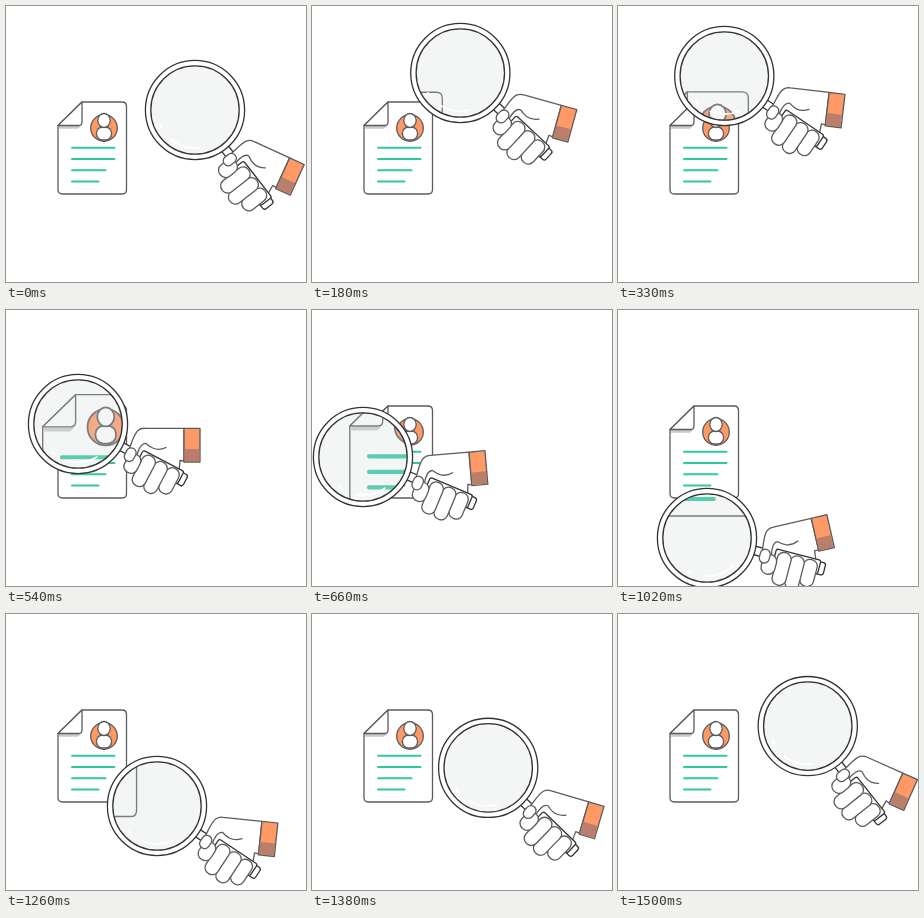
Recreate the animation shown at these times as an HTML page. Size 300 by 276 pixels, loop 1530 ms.

```html
<!DOCTYPE html>
<html lang="en">
<head>
<meta charset="utf-8">
<title>Magnifier scanning a profile</title>
<style>
  html, body { margin: 0; width: 100%; height: 100%; overflow: hidden; background: #fff; }
  svg { display: block; width: 100vw; height: 100vh; --edge: 1.3; --bar: 2; --lift: 0px; }
  #zoom { --edge: 1; --bar: 3; --lift: -2.3px; }
  .line { fill: #fff; stroke: #5c5c5e; stroke-width: 1.3; stroke-linejoin: round; stroke-linecap: round; }
  .sheet { stroke-width: var(--edge); }
  .dark { stroke: #343436; }
  .none { fill: none; }
  .orange { fill: #ff9966; }
  .avatar { transform: translateY(var(--lift)); }
  .bars { fill: none; stroke: #2fc9a0; stroke-width: var(--bar); stroke-linecap: round; }
  .shine { fill: none; stroke: #fff; stroke-width: 1.6; stroke-linecap: round; }
</style>
</head>
<body>
<svg viewBox="0 0 300 276">
  <defs>
    <clipPath id="glass"><circle r="44.5"/></clipPath>
    <g id="page">
      <path class="line sheet" d="M76 96H116Q120.500 96 120.500 100.500V183.500Q120.500 188 116 188H56.500Q52 188 52 183.500V119.500Z"/>
      <path d="M53 120H75L72 122.800H53Z" fill="#c9cbcb"/>
      <path class="line sheet" d="M76 96V116Q76 119.500 72.500 119.500H52Z"/>
      <g class="avatar">
        <circle class="line orange" cx="98" cy="122" r="13.300"/>
        <rect class="line" x="90.500" y="121" width="15" height="13" rx="6"/>
        <ellipse class="line" cx="98" cy="114.500" rx="6.200" ry="7"/>
      </g>
      <path class="bars" id="bars"/>
    </g>
  </defs>

  <use href="#page"/>

  <g id="lens">
    <g id="neck">
      <rect class="line dark" x="48" y="-4.300" width="16" height="8.600" transform="rotate(27.600)"/>
    </g>
    <circle class="line dark" r="49.600"/>
    <g clip-path="url(#glass)">
      <rect x="-50" y="-50" width="100" height="100" fill="#fff"/>
      <use id="zoom" href="#page"/>
      <circle r="45" fill="#d4d9d9" opacity=".26"/>
    </g>
    <circle class="line dark none" r="44.200"/>
    <g id="hand">
      <path class="shine" d="M-9.800 36.700A38 38 0 0 0 19 33M-26 27.700A38 38 0 0 0 -22.800 30.400"/>
      <path class="line" d="M51 25C54 18 56 10 60 6.500Q63 4 67 4.300H106V37L102 36.500L101 48L70 44L54 36Z"/>
      <path class="line none" d="M59 31C61 24 64 19 68 19.500C72 23 78 28 88 23.500"/>
      <rect class="line orange" x="106" y="4.300" width="16" height="33.700"/>
      <rect x="106.600" y="25" width="14.800" height="12.400" fill="#b97f6c"/>
      <g transform="rotate(27.600)">
        <rect class="line dark" x="112" y="-5.500" width="9.500" height="12.500" rx="2.500"/>
        <rect class="line dark" x="70" y="-7" width="46" height="14" rx="2"/>
        <g id="fingers"></g>
        <rect class="line" x="55.500" y="-4" width="10" height="14" rx="5"/>
      </g>
    </g>
  </g>
</svg>
<script>
const LOOP = 1530, STEP = 30, ZOOM = 1.37;
const $ = id => document.getElementById(id);

// Lens pose at a few moments: ms, x, y, tilt
const poses = [
  [0, 189, 104, 24.5], [240, 131, 63.6, 11.5], [330, 106.3, 70, 6.6], [540, 72, 114, 0],
  [660, 51, 147, -5], [780, 67, 177.5, -9.5], [1020, 89, 228, -13], [1260, 151, 192, 6]
];

// Closed cubic spline through unevenly timed poses
function poseAt(t) {
  const n = poses.length;
  const key = i => {
    const [ms, ...rest] = poses[(i + n) % n];
    return [ms + Math.floor(i / n) * LOOP, ...rest];
  };
  const i = poses.findLastIndex(p => p[0] <= t);
  const [a, b, c, d] = [i - 1, i, i + 1, i + 2].map(key);
  const slope = (p, q, j) => (q[j] - p[j]) / (q[0] - p[0]);
  const tangent = (p, q, r, j) => {
    const h = q[0] - p[0], g = r[0] - q[0];
    return (slope(p, q, j) * g + slope(q, r, j) * h) / (h + g);
  };
  const span = c[0] - b[0], s = (t - b[0]) / span, w = 1 - s;
  return [1, 2, 3].map(j =>
    b[j] * (1 + 2 * s) * w * w + c[j] * s * s * (3 - 2 * s)
    + span * s * w * (tangent(a, b, c, j) * w - tangent(b, c, d, j) * s));
}

$('bars').setAttribute('d', [43, 43, 34, 27]
  .map((width, i) => `M66 ${141.7 + 11.3 * i}h${width - 0.5}`).join(''));

// Knuckles sit along the handle, their tips on an arc
for (let i = 3; i >= 0; i--) {
  const top = i ? -5.5 : 0, tip = 29 - 3.6 * (i - 1.6) ** 2;
  $('fingers').innerHTML +=
    `<rect class="line" x="${59.5 + 13.5 * i}" y="${top}" width="14" height="${tip - top}" rx="6.5"/>`;
}

function draw(now) {
  const t = Math.floor(now % LOOP / STEP) * STEP;
  const [x, y, tilt] = poseAt(t);
  const left = 36.5 + 5.5 * Math.exp(-(((t - 900) / 200) ** 2));
  const top = 86.5 - 10 * (t / 1260) ** 2;
  $('lens').setAttribute('transform', `translate(${x} ${y})`);
  for (const id of ['neck', 'hand']) $(id).setAttribute('transform', `rotate(${tilt})`);
  $('zoom').setAttribute('transform',
    `translate(${left - x} ${top - y}) scale(${ZOOM}) translate(-52 -96)`);
}

const start = performance.now();
function tick() {
  draw(performance.now() - start);
  requestAnimationFrame(tick);
}
tick();
</script>
</body>
</html>
```
